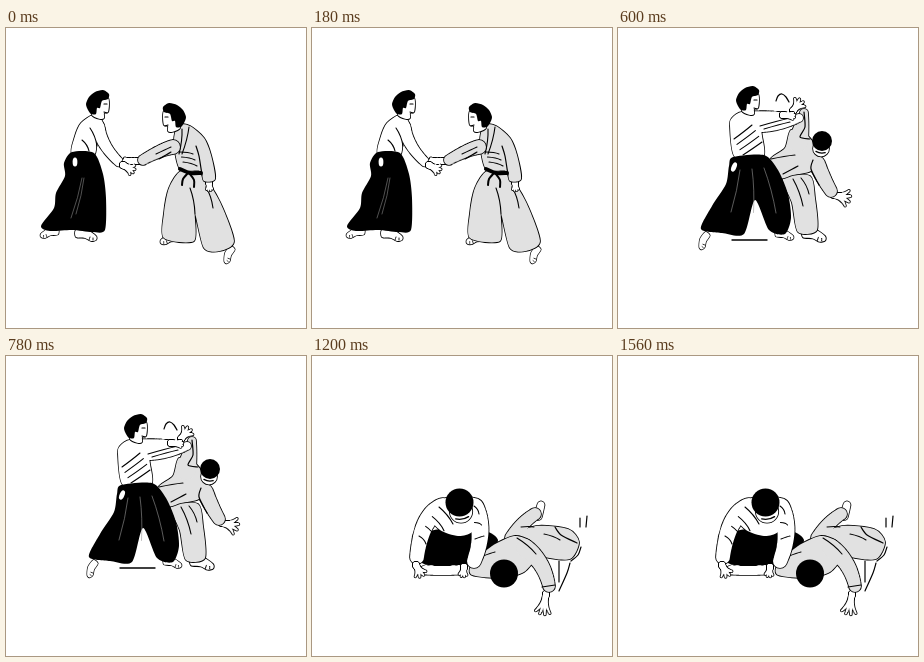
An HTML page with a canvas for the animation above (1.8 s loop, 300x300 px).

```html
<!DOCTYPE html>
<html lang="en">
<head>
<meta charset="utf-8">
<title>Aikido throw</title>
<style>
html, body { margin: 0; width: 100%; height: 100%; overflow: hidden; background: #fff; }
canvas { display: block; }
</style>
</head>
<body>
<canvas id="stage" width="300" height="300"></canvas>
<script>
const ctx = document.getElementById('stage').getContext('2d');
const WHITE = '#fff', GRAY = '#e1e1e1', BLACK = '#000';
const mix = (a, b, t) => a + (b - a) * t;

// Smooth curve through the key points "x,y x,y ...".
function curve(text, closed) {
  const p = text.split(' ').map(s => s.split(',').map(Number));
  const n = p.length, k = 0.13, path = new Path2D();
  const at = i => closed ? p[(i + n) % n] : p[Math.max(0, Math.min(n - 1, i))];
  path.moveTo(...p[0]);
  for (let i = 0; i < (closed ? n : n - 1); i++) {
    const [a, b, c, d] = [at(i - 1), at(i), at(i + 1), at(i + 2)];
    path.bezierCurveTo(
      b[0] + (c[0] - a[0]) * k, b[1] + (c[1] - a[1]) * k,
      c[0] - (d[0] - b[0]) * k, c[1] - (d[1] - b[1]) * k, ...c);
  }
  return path;
}

// Tapered tube from a to c, bent towards b.
function limb(ax, ay, bx, by, cx, cy, r0, r1) {
  const path = new Path2D();
  for (let t = 0; t <= 1; t += 1 / 64) {
    const x = mix(mix(ax, bx, t), mix(bx, cx, t), t);
    const y = mix(mix(ay, by, t), mix(by, cy, t), t);
    const r = mix(r0, r1, t);
    path.moveTo(x + r, y);
    path.arc(x, y, r, 0, 7);
  }
  return path;
}

// Fills several parts as one piece with a single outline.
function cloth(fill, ...parts) {
  const paths = parts.map(p => Array.isArray(p) ? limb(...p) : curve(p, true));
  ctx.lineWidth = 1.7;
  ctx.fillStyle = fill;
  paths.forEach(p => ctx.stroke(p));
  paths.forEach(p => ctx.fill(p));
}
function ink(text) {
  ctx.fillStyle = BLACK;
  ctx.fill(curve(text, true));
}
function line(text, width = 1.2) {
  ctx.lineWidth = width;
  ctx.stroke(curve(text));
}
function oval(fill, x, y, rx, ry = rx, angle = 0) {
  ctx.beginPath();
  ctx.ellipse(x, y, rx, ry, angle, 0, 7);
  ctx.fillStyle = fill;
  ctx.fill();
}

// n creases blending from segment a to segment b.
function folds(n, a, b, color = BLACK) {
  ctx.strokeStyle = color;
  ctx.lineWidth = color === BLACK ? 1.1 : 0.6;
  for (let i = 0; i < n; i++) {
    const [x1, y1, x2, y2] = a.map((v, j) => mix(v, b[j], i / (n - 1)));
    ctx.beginPath();
    ctx.moveTo(x1, y1);
    ctx.quadraticCurveTo(mix(x1, x2, 0.5) + 2, mix(y1, y2, 0.5) - 1, x2, y2);
    ctx.stroke();
  }
  ctx.strokeStyle = BLACK;
}

function local(x, y, sx, sy, angle, paint) {
  ctx.save();
  ctx.translate(x, y);
  ctx.scale(sx, sy);
  ctx.rotate(angle);
  paint();
  ctx.restore();
}
function hand(x, y, angle, spread = 0.3, length = 9) {
  const fingers = [-1.5, -0.5, 0.5, 1.5].map(i => {
    const a = angle + spread * i, r = length - Math.abs(i);
    return [x, y, x + Math.cos(angle) * r / 2, y + Math.sin(angle) * r / 2,
      x + Math.cos(a) * r, y + Math.sin(a) * r, 3, 0.9];
  });
  cloth(WHITE, ...fingers);
}
function foot(x, y, dir = 1, size = 1, angle = 0) {
  local(x, y, dir * size, size, angle, () => {
    cloth(WHITE, '0,-4 0,3 9,4 15,7 20,6 20,2 11,-4');
    line('13,6 14,3', 0.9);
    line('17,6 17,4', 0.9);
  });
}
function head(x, y, dir = 1) {
  local(x, y, dir, 1, 0, () => {
    cloth(WHITE, '7,15 6,25 14,29 18,28 18,23 22,22 23,14 22,8 15,6');
    line('18,14 21,14');
    line('18,22 21,23');
    ink('0,14 3,7 9,2 17,0 23,4 22,9 16,11 14,18 11,18 10,24 5,24 2,20');
  });
}
// Head seen from above, the face showing on the side of the tilt.
function bowed(x, y, r, tilt, show = 0.65) {
  const fx = x + Math.cos(tilt) * r * show, fy = y + Math.sin(tilt) * r * show;
  cloth(WHITE, [fx, fy, fx, fy, fx, fy, r * 0.8, r * 0.8]);
  oval(BLACK, x, y, r);
  ctx.lineWidth = 1.3;
  ctx.beginPath();
  ctx.arc(x, y, r * 1.2, tilt - 0.4, tilt + 0.4);
  ctx.stroke();
}

// The attacker standing, without the reaching arm.
function stance() {
  foot(173, 210, -1, 0.9);
  foot(227, 220, -1, 0.8, -0.9 + 1.8);
  cloth(GRAY, '175,143 163,160 158,185 158,210 188,213 189,186 198,220 214,223 228,213 214,174 196,147');
  folds(2, [189, 186, 184, 160], [207, 180, 200, 159]);
  hand(203, 154, 1.5, 0.25);
  cloth(GRAY, '172,97 184,98 198,110 205,127 209,151 198,153 194,143 174,141 168,114');
  folds(2, [176, 101, 173, 126], [183, 99, 176, 126]);
  folds(3, [174, 124, 187, 126], [177, 134, 191, 138]);
  line('190,118 193,128 196,147');
  line('174,141 184,145 195,145', 4);
  line('182,145 177,151 176,157', 2);
  line('183,145 188,152 188,159', 2);
  head(180, 75, -1);
}

function grip() {
  foot(52, 204, -1, 0.85);
  foot(70, 206);
  cloth(WHITE, '87,87 75,95 69,108 66,126 88,127 91,112 99,104 95,91', [92, 99, 96, 118, 113, 134, 6.5, 4.5]);
  folds(2, [84, 100, 91, 118], [76, 112, 83, 123]);
  ink('66,124 88,125 97,146 100,170 99,202 86,204 66,202 44,203 35,198 48,180 50,165 59,148 58,135');
  folds(2, [76, 150, 65, 190], [78, 150, 70, 186], '#888');
  oval(WHITE, 69, 134, 2.4, 4.5);
  head(80, 62);
  stance();
  hand(133, 133, 3.1, 0.15, 16);
  cloth(GRAY, [167, 119, 154, 122, 137, 132, 7, 5]);
  folds(2, [150, 126, 165, 119], [153, 131, 165, 124]);
  hand(117, 137, 0.5, 0.3, 13);
}

function lift() {
  foot(70, 207, 1, 1.15);
  cloth(WHITE, '88,88 75,96 64,126 89,126 94,112 97,103 95,91', [89, 102, 84, 128, 112, 113, 6.5, 4]);
  folds(2, [82, 102, 93, 116], [74, 115, 87, 123]);
  ink('63,126 89,124 100,150 103,170 98,202 82,205 62,200 58,178 61,146 57,140');
  oval(WHITE, 70, 135, 1.8, 4.5, 0.3);
  head(81, 63);
  local(1, 0, 1, 1, 0, stance);
  cloth(GRAY, [168, 118, 150, 117, 135, 113, 7, 5]);
  folds(2, [150, 117, 167, 117], [155, 121, 167, 122]);
  hand(117, 110, -1.4, 0.25, 18);
  hand(131, 113, 3.4, 0.2, 17);
  line('110,108 115,118', 1.6);
}

function turn() {
  foot(185, 206, 1, 1.1);
  cloth(GRAY, '165,150 192,148 197,170 199,202 180,204 174,175');
  folds(2, [175, 151, 185, 178], [183, 150, 191, 166]);
  hand(216, 167, 0.25, 0.35, 17);
  cloth(GRAY, '173,102 190,108 202,128 193,143 175,147 162,150 152,132 167,120',
    [186, 85, 184, 98, 180, 114, 4, 10], [199, 136, 206, 152, 213, 163, 8, 6]);
  folds(2, [153, 131, 177, 127], [165, 146, 180, 138]);
  line('186,84 187,99 182,109 192,111');
  line('195,132 193,141 201,157');
  bowed(204, 113, 10, 1.7, 0.75);
  foot(90, 206, -1, 0.8, 0.9);
  foot(158, 206, 1, 0.85);
  line('114,212 149,212', 1.4);
  cloth(WHITE, '124,84 114,90 112,98 117,129 145,129 144,108 140,92',
    [130, 91, 150, 88, 170, 89, 7, 4], [134, 97, 158, 100, 181, 90, 7, 4]);
  folds(2, [142, 98, 172, 90], [146, 101, 172, 94]);
  folds(4, [134, 97, 116, 111], [144, 114, 125, 127]);
  ink('115,129 146,127 160,142 170,166 173,190 167,206 151,202 137,172 126,206 104,205 83,201 94,178 108,156 111,138');
  oval(WHITE, 116, 139, 2.4, 5, 0.4);
  folds(3, [122, 142, 113, 184], [146, 140, 158, 185], '#999');
  head(118, 58);
  hand(175, 83, -0.9, 0.35, 14);
  hand(165, 87, 0.1, 0.2, 12);
  line('158,73 160,68 164,66 168,69 171,74');
}

function press() {
  line('180,98 193,95 216,93');
  line('194,89 206,87 217,87');
  foot(211, 197, 1, 1.1);
  cloth(GRAY, '200,146 224,146 231,172 231,191 212,195 192,186');
  folds(2, [211, 151, 193, 179], [216, 152, 211, 174]);
  hand(228, 91, -1.7, 0.2, 13);
  cloth(GRAY, '212,112 221,122 222,145 205,157 191,152 204,122', [230, 97, 228, 104, 216, 118, 4.5, 8]);
  folds(2, [207, 121, 197, 145], [215, 119, 212, 136]);
  bowed(231, 118, 10, 1.2, 0.75);
  foot(95, 201, -1, 0.85, 0.5);
  foot(172, 205, 1, 1.05);
  ink('143,146 172,160 189,170 193,203 153,204 149,188 133,207 119,212 95,209 80,199 95,187 115,182 127,172 123,156 130,147');
  oval(WHITE, 133, 154, 4, 7, 0.75);
  cloth(WHITE, '176,113 156,121 141,146 156,163 170,175 190,164 196,125');
  folds(3, [159, 125, 164, 148], [182, 122, 184, 146]);
  folds(2, [149, 145, 160, 149], [159, 163, 169, 160]);
  ink('171,156 190,165 193,176 178,172');
  hand(200, 146, 0.9, 0.3, 9);
  cloth(WHITE, [197, 150, 191, 160, 182, 177, 5, 4]);
  hand(175, 175, 0.3, 0.25, 17);
  bowed(188, 114, 12, 1.35);
}

function pin() {
  cloth(WHITE, [229, 149, 228, 153, 226, 160, 3.5, 4]);
  cloth(GRAY, [223, 158, 210, 166, 200, 182, 6, 7], '200,182 224,170 256,173 267,186 258,203 230,200');
  folds(2, [209, 171, 222, 171], [232, 178, 248, 184]);
  line('243,171 249,179 265,187');
  ink('172,176 186,184 175,203 160,205');
  hand(234, 238, 1.75, 0.25, 21);
  cloth(GRAY, '160,208 180,190 202,180 218,185 224,200 212,216 190,222 160,219',
    [213, 192, 232, 205, 237, 230, 9, 6]);
  folds(2, [171, 200, 183, 196], [205, 182, 224, 198]);
  line('230,231 243,229');
  oval(BLACK, 192, 217.5, 14);
  ink('116,176 160,174 166,195 156,209 110,207');
  cloth(WHITE, '134,142 162,142 172,158 160,176 146,180 128,174 118,160',
    [131, 152, 110, 158, 105, 201, 10, 7], [162, 152, 174, 175, 162, 205, 10, 7]);
  folds(4, [127, 151, 141, 168], [107, 180, 114, 188]);
  folds(3, [162, 150, 167, 158], [163, 183, 172, 180]);
  cloth(WHITE, [113, 214, 130, 215, 148, 214, 4.5, 4.5]);
  hand(104, 209, 1.1, 0.35, 13);
  hand(152, 211, 1.7, 0.3, 10);
  bowed(147.5, 146.5, 14, 1.4);
  line('268,162 268,171');
  line('275,160 274,171');
  line('269,191 266,199 259,205');
  line('258,207 255,217 247,235');
  line('247,205 247,226');
}

const poses = [grip, lift, turn, press, pin];

function draw() {
  const step = Math.floor((performance.now() % 1800) / 300);
  ctx.fillStyle = WHITE;
  ctx.fillRect(0, 0, 300, 300);
  ctx.strokeStyle = BLACK;
  ctx.lineJoin = ctx.lineCap = 'round';
  poses[Math.min(step, 4)]();
  requestAnimationFrame(draw);
}
draw();
</script>
</body>
</html>
```
